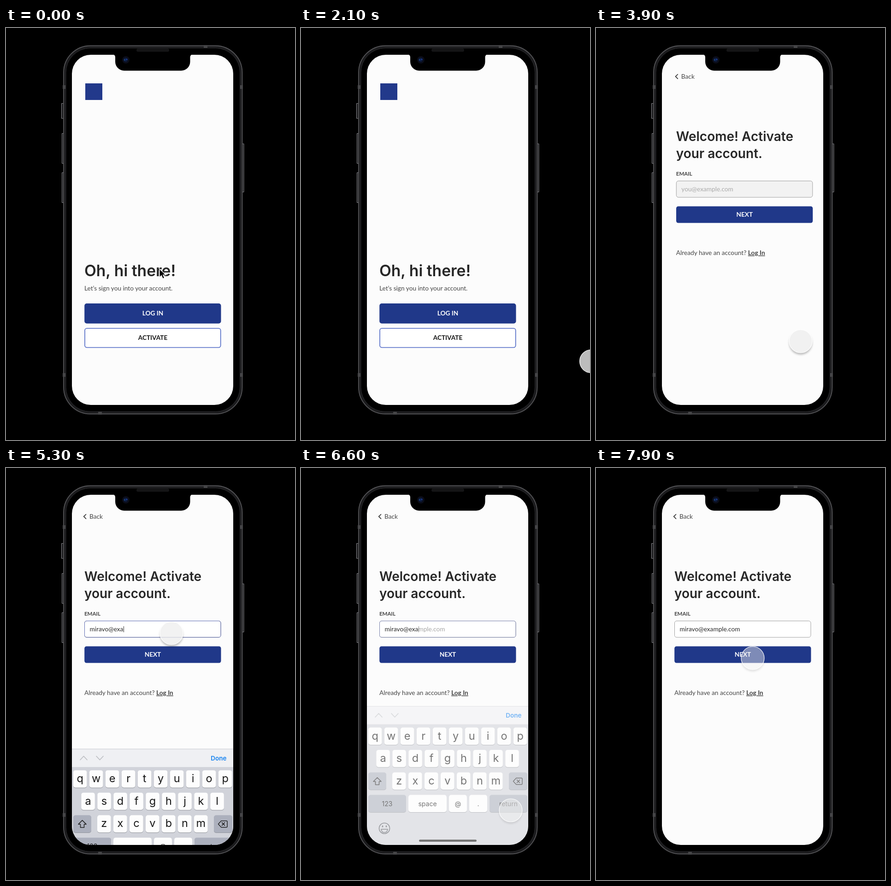
Write an HTML page that moves like this. It is 627 by 893 pixels and loops after 8 s.

```html
<!DOCTYPE html>
<html lang="en">
<head>
<meta charset="utf-8">
<title>Account activation</title>
<style>
  html, body { margin: 0; height: 100%; overflow: hidden; background: #000; }
  svg { display: block; width: 100%; height: 100%; }
  text { font: 13.7px Lato, sans-serif; fill: #444; }
  .head { font: 600 28px Inter, sans-serif; fill: #272727; }
  .label { font-size: 13.6px; font-weight: 700; text-anchor: middle; }
  .key { font: 23.5px Inter, sans-serif; fill: #161616; text-anchor: middle; }
  .small { font-size: 14px; }
  .line { fill: none; stroke-linecap: round; stroke-linejoin: round; }
</style>
</head>
<body>
<svg viewBox="0 0 627 893">
  <defs>
    <clipPath id="screen"><rect x="143" y="58" width="350" height="759" rx="41"/></clipPath>
    <filter id="soft" x="-50%" y="-50%" width="200%" height="200%"><feGaussianBlur stdDeviation="2.2"/></filter>
    <mask id="outside">
      <rect x="-40" y="-40" width="80" height="80" fill="#fff"/>
      <circle r="25" fill="#000"/>
    </mask>
  </defs>

  <g id="phone">
    <g fill="#1b1b1d" stroke="#8b8b90">
      <path d="M124 163.500h-3.500v32.500h3.500M125 228.500h-3.500v65h3.500M125 313.500h-3.500v65h3.500M512 251h4v104.500h-4"/>
    </g>
    <rect x="125" y="38.500" width="387.500" height="798" rx="58" fill="#1b1b1d" stroke="#555558" stroke-width="1.800"/>
    <rect x="130" y="43.500" width="377.500" height="788" rx="53" fill="#000" stroke="#2b2b2e"/>
    <path d="M429 37h8v6h-8zM200 832h8v6h-8zM123 124h6v8h-6zM508 124h6v8h-6zM123 748h6v8h-6zM508 748h6v8h-6z" fill="#454547"/>
  </g>

  <g clip-path="url(#screen)">
    <rect x="143" y="58" width="351" height="760" fill="#fcfcfc"/>

    <g id="welcome">
      <rect x="172" y="120" width="37" height="36" fill="#22398b"/>
      <text class="head" x="170" y="537.500" style="font-size:33.600px">Oh, hi there!</text>
      <text x="170" y="569">Let’s sign you into your account.</text>
      <rect x="170.200" y="597" width="296.300" height="43.500" rx="5" fill="#203889"/>
      <text class="label" x="318.500" y="623" style="fill:#fff">LOG IN</text>
      <rect x="171" y="651" width="294.700" height="41.500" rx="4.500" fill="#fff" stroke="#4c66c4" stroke-width="1.600"/>
      <text class="label" x="318.500" y="676" style="fill:#151515">ACTIVATE</text>
    </g>

    <g id="form">
      <path class="line" d="M173.500 100.500l-4.800 4.700 4.800 4.700" stroke="#333" stroke-width="1.700"/>
      <text x="181" y="109.500">Back</text>
      <text class="head" x="170" y="245">Welcome! Activate</text>
      <text class="head" x="170" y="281.500">your account.</text>
      <text x="170" y="320" style="font-size:11.500px;font-weight:700">EMAIL</text>
      <rect id="field" x="170.500" y="331.500" width="295.500" height="35.500" rx="4.500" stroke="#a0a0a0"/>
      <rect id="focus" x="170.500" y="331.500" width="295.500" height="35.500" rx="4.500" fill="none" stroke="#5f6db4"/>
      <text id="hint" x="181.500" y="354" style="fill:#aaa">you@example.com</text>
      <text id="entry" x="181.500" y="354" style="fill:#2b2b2b"><tspan id="typed">miravo@exa</tspan><tspan id="rest">mple.com</tspan></text>
      <rect id="caret" y="343" width="1" height="13" fill="#333"/>
      <rect x="170.200" y="386.500" width="296.300" height="36" rx="4.500" fill="#203889"/>
      <text class="label" x="318.500" y="409" style="fill:#fff">NEXT</text>
      <text x="170" y="492">Already have an account? <tspan font-weight="700" text-decoration="underline">Log In</tspan></text>
    </g>

    <g id="keyboard"></g>
  </g>

  <g id="notch">
    <path d="M231 57h174.500a6 6 0 0 0-6 6v10a19.500 19.500 0 0 1-19.500 19.500h-123.500a19.500 19.500 0 0 1-19.500-19.500v-10a6 6 0 0 0-6-6z"/>
    <rect x="283" y="44.500" width="71" height="7" rx="3.500" fill="#151516"/>
    <circle cx="260" cy="69" r="8" fill="#0b0d18"/>
    <circle cx="259.500" cy="69" r="4.500" fill="#0d1a3c"/>
    <circle cx="257.500" cy="69" r="1.800" fill="#17427c"/>
    <circle cx="262" cy="68" r="1.500" fill="#1b3da0"/>
  </g>

  <g id="touch">
    <circle id="shadow" cy="4" r="25" fill="#000" filter="url(#soft)" mask="url(#outside)"/>
    <circle id="disc" r="25" fill="#efefef"/>
    <circle r="25" fill="none" stroke="#fff" stroke-width="1.200"/>
  </g>
  <path id="pointer" d="M333 522v18.500l4.300-4 3 6.700 3.400-1.500-3-6.500h6z" stroke="#fff" stroke-width="1.200"/>
</svg>

<script>
const LOOP = 8000, SCREEN_W = 350, KEYBOARD_H = 301;
const $ = id => document.getElementById(id);
const clamp = v => Math.min(1, Math.max(0, v));
const easeOut = (t, start, duration = 300) => 1 - (1 - clamp((t - start) / duration)) ** 1.7;
const smooth = p => p * p * (3 - 2 * p);
const show = (id, visible) => $(id).setAttribute('visibility', visible ? 'visible' : 'hidden');
const fade = (id, opacity) => $(id).setAttribute('opacity', opacity);
const move = (id, x, y) => $(id).setAttribute('transform', `translate(${x} ${y})`);

function key(x, y, w, label = '', cls = '', fill = '#fdfdfd') {
  const baseline = y + (cls ? 24 : 26);
  return `<rect x="${x}" y="${y + 1}" width="${w}" height="37.500" rx="5" fill="#92959c"/>
    <rect x="${x}" y="${y}" width="${w}" height="37.500" rx="5" fill="${fill}"/>
    <text class="key ${cls}" x="${x + w / 2}" y="${baseline}">${label}</text>`;
}
const keyRow = (letters, x, y) =>
  [...letters].map((letter, i) => key(x + i * 35, y, 29.7, letter)).join('');

const GRAY = '#acb0bd';
$('keyboard').innerHTML = `
  <rect x="143" y="516" width="351" height="302" fill="#d1d3da"/>
  <rect x="143" y="516" width="351" height="39.500" fill="#eff0f3"/>
  <path d="M143 516.500h351" stroke="#cfd0d4"/>
  <path class="line" d="M161 540l7.500-8 7.500 8M196 532l7.500 8 7.500-8" stroke="#bfc1c5" stroke-width="1.600"/>
  <text x="478.500" y="541" text-anchor="end" style="font:600 13.500px Inter,sans-serif;fill:#1683f0">Done</text>
  ${keyRow('qwertyuiop', 145.8, 562.5)}
  ${keyRow('asdfghjkl', 163.2, 611)}
  ${keyRow('zxcvbnm', 198, 659.8)}
  ${key(146, 659.8, 39, '', '', GRAY)}
  ${key(451, 659.8, 40, '', '', GRAY)}
  <g class="line" stroke="#222" stroke-width="1.500">
    <path d="M165.500 671l8.500 8.500h-4.500v7h-8v-7h-4.500z"/>
    <path d="M467 672h11q2 0 2 2v10q0 2-2 2h-11l-6.500-7zM468.500 676l6 6M474.500 676l-6 6"/>
  </g>
  ${key(146, 708.5, 82, '123', 'small', GRAY)}
  ${key(233, 708.5, 83, 'space', 'small')}
  ${key(321, 708.5, 39, '@', 'small')}
  ${key(365, 708.5, 39, '.', 'small')}
  ${key(409, 708.5, 82, 'return', 'small', GRAY)}
  <g class="line" stroke="#50535a" stroke-width="1.600">
    <circle cx="181" cy="781" r="11.500"/>
    <path d="M174 783h14q-1 7-7 7t-7-7z"/>
    <path d="M177 776v1.500M185 776v1.500" stroke-width="2.500"/>
  </g>
  <rect x="256" y="805.500" width="125" height="4.500" rx="2.250" fill="#111"/>`;
$('caret').setAttribute('x', 182 + $('typed').getComputedTextLength());

// Touch moves: start, end, then a quadratic curve as from, control, to.
const MOVES = [
  [1880, 2900, [652, 732], [560, 690], [449, 682]],
  [3300, 3900, [449, 682], [446, 681], [444, 679]],
  [4200, 5000, [444, 679], [440, 377], [359, 358]],
  [5850, 6450, [359, 358], [390, 560], [455, 742]],
  [6850, 7700, [455, 742], [420, 430], [340, 412]]
];
const PRESSES = [[3500, 3650], [5050, 5200], [6450, 6700], [7850, LOOP]];

function touchAt(t) {
  const [start, end, a, b, c] = MOVES.findLast(m => t >= m[0]) || MOVES[0];
  const p = smooth(clamp((t - start) / (end - start))), q = 1 - p;
  return [0, 1].map(i => q * q * a[i] + 2 * p * q * b[i] + p * p * c[i]);
}

function draw(t) {
  show('pointer', t < 100);

  const push = easeOut(t, 3622);
  move('welcome', -SCREEN_W * push, 0);
  move('form', SCREEN_W * (1 - push), 0);

  const focused = t >= 5150;
  const done = easeOut(t, 6520);
  show('hint', !focused);
  show('entry', focused);
  $('field').setAttribute('fill', focused ? '#fff' : '#f2f2f2');
  fade('focus', focused ? 1 - done : 0);
  fade('caret', focused ? 1 - done : 0);
  $('rest').setAttribute('fill-opacity', done);

  move('keyboard', 0, KEYBOARD_H * (1 - easeOut(t, 5151)));
  fade('keyboard', 1 - done);

  const pressed = PRESSES.some(([from, to]) => t >= from && t < to);
  show('touch', t >= MOVES[0][0]);
  move('touch', ...touchAt(t));
  fade('disc', pressed ? 0.45 : 0.79);
  fade('shadow', pressed ? 0.1 : 0.25);
}

const origin = performance.now();
function tick() {
  draw((performance.now() - origin) % LOOP);
  requestAnimationFrame(tick);
}
tick();
</script>
</body>
</html>
```
